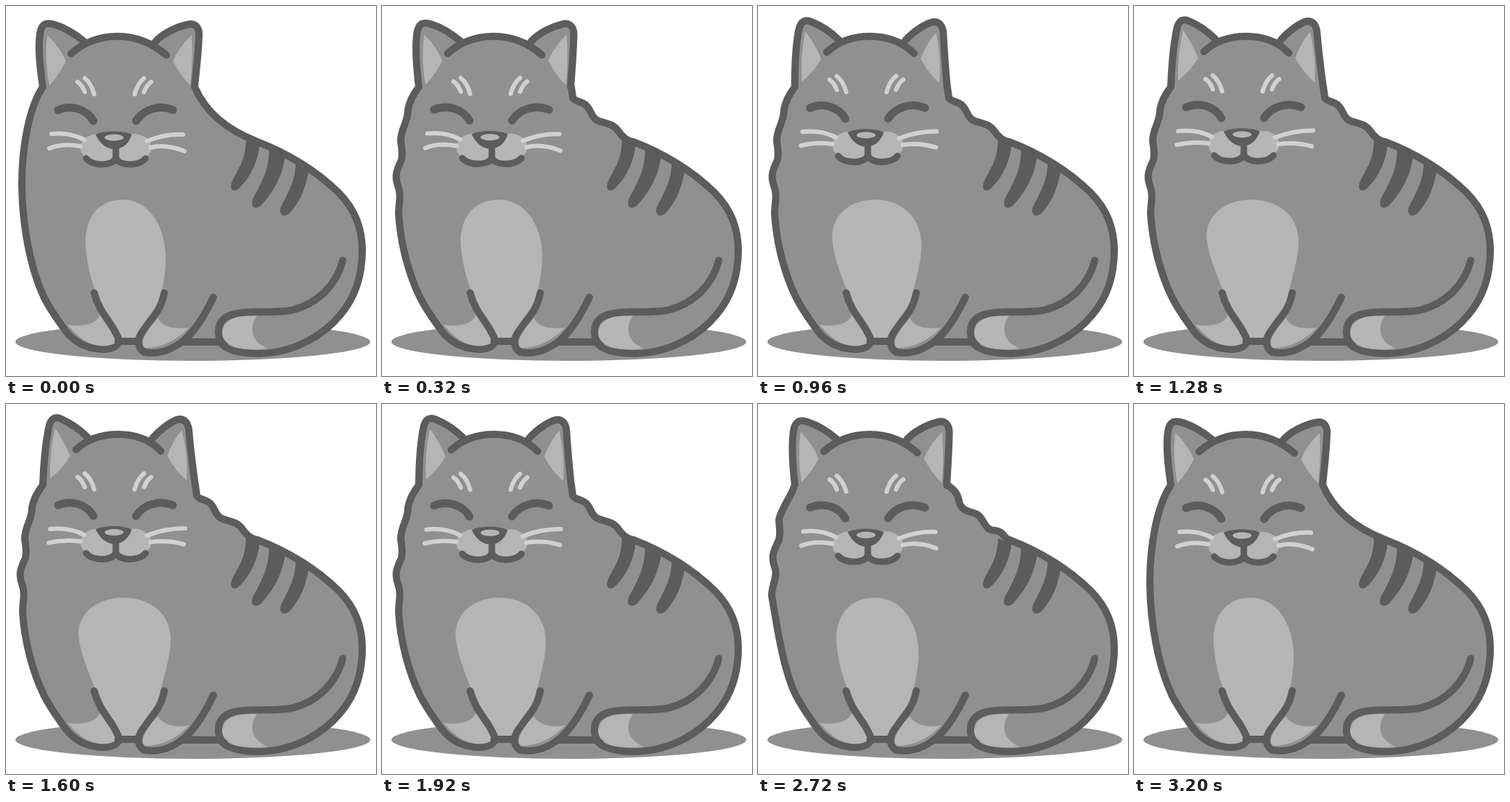
An HTML page that plays this animation: 512 by 512 pixels, repeating every 3.36 s.

```html
<!DOCTYPE html>
<html lang="en">
<head>
<meta charset="utf-8">
<title>Purring cat</title>
<style>
html, body { margin: 0; width: 100%; height: 100%; overflow: hidden; background: #fff; }
svg { display: block; width: 100vw; height: 100vh; }
</style>
</head>
<body>
<svg id="stage" viewBox="0 0 512 512" stroke-linecap="round" stroke-linejoin="round"></svg>
<script>
const FUR = '#909090', DARK = '#5c5c5c', LIGHT = '#b5b5b5', PALE = '#d1d1d1';
const STEP = 80, LAST = 40, LOOP = 3360, PEAK = 18;
const stage = document.getElementById('stage');

// Blend two paths that share the same commands.
function mix(a, b, k) {
  const to = b.match(/-?[\d.]+/g);
  let i = 0;
  return a.replace(/-?[\d.]+/g, n => (+n + (to[i++] - n) * k).toFixed(2));
}
const shape = (d, fill) => `<path d="${d}" fill="${fill}"/>`;
const line = (d, color = DARK, width = 10, fill = 'none') =>
  `<path d="${d}" fill="${fill}" stroke="${color}" stroke-width="${width}"/>`;
const oval = (x, y, rx, ry, fill) =>
  `<ellipse cx="${x}" cy="${y}" rx="${rx}" ry="${ry}" fill="${fill}"/>`;

// Flank and shoulder outlines: at rest and at both ends of the purr.
const calm = {
  left: 'C32,140 22,195 22,245 C22,300 33,362 53,404',
  right: 'C303,170 276,146 261,112'
};
const rippleA = {
  left: 'C44,121 38,132 36,143 C36,162 26,168 26,187 C27,197 29,202 27,213 C18,231 18,238 23,252 C27,264 23,272 23,287 C25,325 36,370 53,404',
  right: 'C340,187 333,182 327,173 C318,160 304,163 296,157 C287,150 289,140 279,135 C273,132 266,131 264,127 L262,112'
};
const rippleB = {
  left: 'C46,128 32,145 29,160 C29,170 32,175 29,188 C20,206 18,212 24,229 C27,240 19,250 19,265 C25,300 35,370 53,404',
  right: 'C340,186 340,176 328,175 C312,175 314,158 302,152 C291,148 281,148 278,134 C276,122 270,118 262,112'
};
const purr = [rippleA, calm, rippleB, calm];

const backdrop = oval(258.5, 464.7, 245.5, 26.3, FUR);

const stripes = [
  'M332,186 C332,215 319,228 312,245 C309,255 316,258 322,253 C340,235 348,215 351,193Z',
  'M364,200 C364,230 350,250 341,268 C338,280 346,282 353,276 C372,255 382,235 386,210Z',
  'M401,218 C400,245 388,262 380,279 C377,290 385,293 392,287 C408,270 415,250 419,228Z'
].map(d => shape(d, DARK)).join('');

const limbs =
  shape('M85,441 C105,445 125,440 130,428 L155,461 C152,470 135,473 120,468 C105,463 95,452 85,441Z', LIGHT) +
  line('M122,397 C128,420 140,432 149,447 C153,455 158,462 155,464') +
  line('M219,397 C214,422 203,430 193,445 C182,458 179,470 191,479 C215,483 235,472 247,462 C263,448 275,428 287,403', DARK, 10, FUR) +
  shape('M210,432 C218,447 240,447 253,445 C235,464 215,473 192,473 C185,467 192,451 210,432Z', LIGHT) +
  line('M158,464 H180 M247,465 H297') +
  shape('M348,428 C338,440 335,463 362,474 C330,478 305,473 299,459 C296,440 312,426 348,428Z', LIGHT) +
  line('M466,352 C457,386 432,412 395,421 C370,426 330,420 310,428 C290,435 290,460 303,470');

function body(side) {
  return line(`M51,112 ${side.left} C62,422 73,436 82,449 C96,467 115,475 135,475
    C150,475 157,468 155,463 L297,465 C303,476 325,481 350,481
    C400,480 440,455 463,427 C484,402 493,372 493,338
    C493,305 480,278 460,258 C430,229 392,205 348,188 ${side.right}`, DARK, 10, FUR);
}

function head(b) {
  const earL = mix('M51,112 C47,85 44,60 47,38 C49,24 56,22 68,26 C84,31 96,39 108,49',
                   'M51,112 C52,85 54,60 59,34 C62,18 69,17 77,21 C91,27 103,36 113,46', b);
  const earR = mix('207,49 C217,38 236,29 250,26 C262,22 268,30 267,42 C266,70 263,90 261,112',
                   '203,47 C212,36 226,26 235,22 C247,18 252,27 253,38 C255,65 259,90 262,114', b);
  return shape(`${earL} Q155,35 ${earR} V116 H51Z`, FUR) +
    shape(mix('M57,40 Q74,56 83,76 Q73,96 60,110 Q53,75 57,40Z',
              'M68,33 Q80,50 89,72 Q78,90 61,103 Q60,70 68,33Z', b), LIGHT) +
    shape(mix('M257,40 Q240,56 231,76 Q241,96 255,110 Q259,75 257,40Z',
              'M243,36 Q231,50 223,72 Q234,92 250,106 Q252,70 243,36Z', b), LIGHT) +
    line(earL) + line('M' + earR) +
    line(mix('M90,66 C108,50 130,42 155,42 C182,42 203,52 222,68',
             'M97,63 C112,49 132,42 155,42 C180,42 200,50 214,65', b));
}

function face(b) {
  const brows = 'M99,105 Q105,109 109,119 M109,100 Q118,107 122,122 M191,100 Q182,107 178,122 M201,105 Q195,109 191,119';
  const eyes = 'M72,144 C90,136 112,143 121,159 M180,159 C190,143 212,136 231,144';
  const muzzle = oval(127, 196, 24, 19, LIGHT) + oval(177, 196, 24, 19, LIGHT) +
    line('M111,211 C120,222 148,222 152,210 V195 M152,195 V210 C156,222 184,222 193,211', DARK, 9, LIGHT) +
    shape('M124,178 C135,172 163,172 174,178 C170,190 162,198 150,198 C138,198 130,190 124,178Z', DARK) +
    oval(149.5, 182, 13, 4.5, LIGHT);
  const whiskers = mix(
    'M63,177 C80,175 95,178 108,185 M60,197 C72,192 88,191 103,194 M195,187 C210,181 228,177 245,178 M200,196 C215,192 232,195 247,201',
    'M61,173 C80,171 95,174 108,181 M59,192 C72,189 88,188 103,190 M195,182 C210,176 228,172 248,172 M200,191 C215,189 232,190 246,194', b);
  return `<g transform="translate(0 ${-4 * b})">${line(brows, PALE, 6)}${line(eyes, DARK, 11)}</g>` +
    `<g transform="translate(0 ${-4.5 * b})">${muzzle}</g>` + line(whiskers, PALE, 6);
}

function chest(b) {
  return shape(mix(
    'M162,268 C130,268 110,290 110,327 C111,355 118,380 125,398 L157,459 H181 C190,435 200,430 212,408 C218,385 221,370 221,345 C219,300 195,268 162,268Z',
    'M162,268 C125,268 100,290 100,318 C102,345 114,370 125,398 L157,459 H181 C190,435 200,430 212,408 C217,378 228,352 228,325 C228,290 200,268 162,268Z', b), LIGHT);
}

function draw(now) {
  const n = Math.min(LAST, Math.floor(now % LOOP / STEP));
  const phase = n < PEAK ? n / PEAK : 1 + (n - PEAK) / (LAST - PEAK);
  const breath = (1 - Math.cos(Math.PI * phase)) / 2;
  const side = n % LAST ? purr[n % 4] : calm;
  stage.innerHTML = backdrop + body(side) + stripes + chest(breath) + limbs + head(breath) + face(breath);
}

const start = performance.now();
function tick() {
  draw(performance.now() - start);
  requestAnimationFrame(tick);
}
tick();
</script>
</body>
</html>
```
